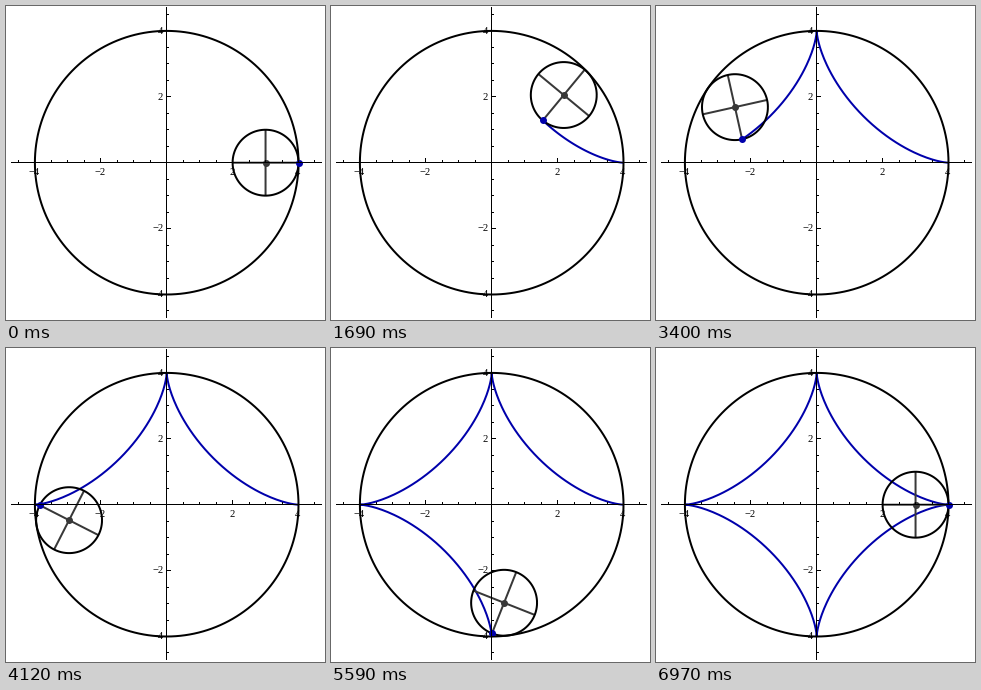
A matplotlib script for the animation above (7.97 s loop, 319x314 px).

```python
import numpy as np
import matplotlib.pyplot as plt
from matplotlib.animation import FuncAnimation
from matplotlib.collections import LineCollection

W, H = 319, 314
PX = 0.72                       # points per pixel at 100 dpi
CX, CY, UNIT = 160.7, 156.7, 32.95
AXIS_X, AXIS_Y, AXIS_HALF = 160.5, 156.5, 155.5
STEPS, STEP_MS, HOLD_MS, TICK_MS = 200, 30, 1000, 10
LOOP_MS = 2 * HOLD_MS + (STEPS - 1) * STEP_MS

BLUE = (0, 0, 0.67)
GRAY = (0.22, 0.22, 0.22)

fig = plt.figure(figsize=(W / 100, H / 100), dpi=100, facecolor="white")
ax = fig.add_axes([0, 0, 1, 1])
ax.set_xlim(0, W)
ax.set_ylim(H, 0)
ax.axis("off")


def place(x, y):
    return CX + UNIT * np.asarray(x), CY - UNIT * np.asarray(y)


def stroke(color, width, z):
    return ax.plot([], [], color=color, lw=width * PX, zorder=z,
                   solid_capstyle="butt", snap=False)[0]


def dot(color, z):
    return ax.plot([], [], "o", color=color, ms=7 * PX, mew=0,
                   zorder=z, snap=False)[0]


def draw_axes():
    lines = [[(AXIS_X - AXIS_HALF, AXIS_Y), (AXIS_X + AXIS_HALF, AXIS_Y)],
             [(AXIS_X, AXIS_Y - AXIS_HALF), (AXIS_X, AXIS_Y + AXIS_HALF)]]
    for i in range(-9, 10):
        if i == 0:
            continue
        size = 4.5 if i % 4 == 0 else 2.5
        x, y = place(i / 2, i / 2)
        x, y = np.floor(x) + 0.5, np.floor(y) + 0.5
        lines.append([(x, AXIS_Y), (x, AXIS_Y - size)])
        lines.append([(AXIS_X, y), (AXIS_X + size, y)])
    ax.add_collection(LineCollection(lines, colors="black", linewidths=PX,
                                     zorder=7, snap=False))
    font = dict(family="Liberation Serif", size=10.5 * PX, zorder=8)
    for v in (-4, -2, 2, 4):
        label = str(v).replace("-", "\u2212")
        x, y = place(v, v)
        ax.text(x - 0.9, 169, label, ha="center", va="baseline", **font)
        ax.text(157.2, y + 2.8, label, ha="right", va="baseline", **font)


draw_axes()

turn = np.linspace(0, 2 * np.pi, 181)
ring_x, ring_y = np.cos(turn), np.sin(turn)

trail = stroke(BLUE, 2, 1)
outer = stroke("black", 2, 2)
outer.set_data(*place(4 * ring_x, 4 * ring_y))
spokes = [stroke(GRAY, 2, 3) for _ in range(2)]
wheel = stroke("black", 2, 4)
hub = dot(GRAY, 5)
pen = dot(BLUE, 6)


def hypocycloid(t):
    return 3 * np.cos(t) + np.cos(3 * t), 3 * np.sin(t) - np.sin(3 * t)


def step_at(ms):
    if ms < HOLD_MS:
        return 0
    return min(STEPS, (ms - HOLD_MS) // STEP_MS + 1)


def update(frame):
    k = step_at(frame * TICK_MS)
    t = 2 * np.pi * k / STEPS
    x, y = 3 * np.cos(t), 3 * np.sin(t)
    wheel.set_data(*place(x + ring_x, y + ring_y))
    for n, spoke in enumerate(spokes):
        a = -3 * t + n * np.pi / 2
        ends = np.array([-1, 1])
        spoke.set_data(*place(x + ends * np.cos(a), y + ends * np.sin(a)))
    hub.set_data(*place([x], [y]))
    trail.set_data(*place(*hypocycloid(np.linspace(0, t, 2 * k + 1))))
    pen.set_data(*place(*hypocycloid(np.array([t]))))
    return [trail, wheel, *spokes, hub, pen]


anim = FuncAnimation(fig, update, frames=LOOP_MS // TICK_MS,
                     interval=TICK_MS, repeat=True, repeat_delay=0)
plt.show()
```
